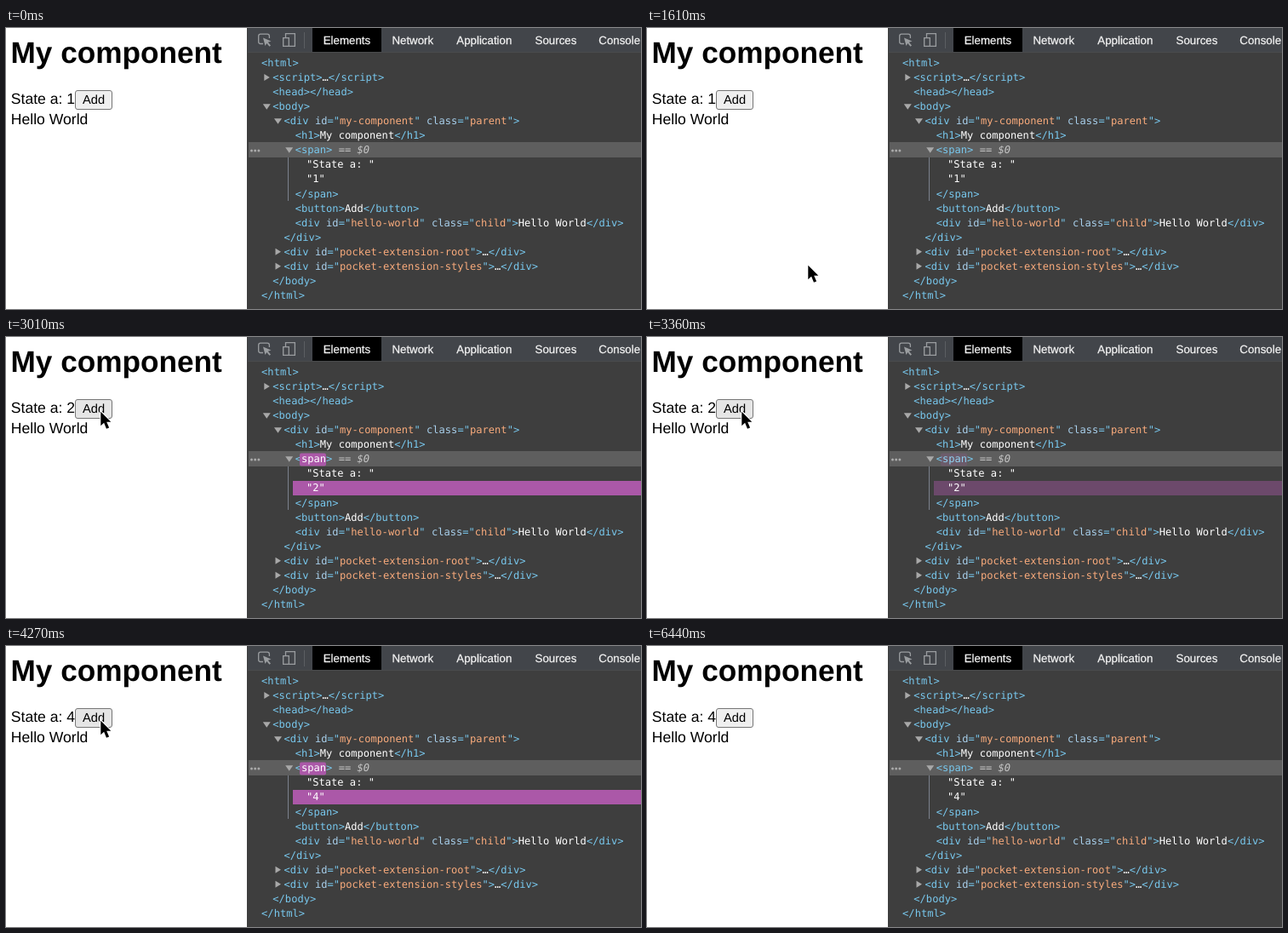
An HTML page that plays this animation: 746 px wide and 330 px high, repeating every 6.51 s.

```html
<!DOCTYPE html>
<html lang="en">
<head>
<meta charset="utf-8">
<title>DOM update demo</title>
<style>
  html, body { margin: 0; width: 100%; height: 100%; overflow: hidden; background: #fff; }
  svg { display: block; font: 17.6px "Liberation Sans", sans-serif; }
  text { white-space: pre; text-rendering: geometricPrecision; }
  #tabs { font-size: 13.3px; fill: #f4f4f4; stroke: #f4f4f4; stroke-width: .25; }
  #tree { font: 12.1px "DejaVu Sans Mono", monospace; fill: #fff; }
  .tag { fill: #78c8ee; }
  .attr { fill: #a9d0ec; }
  .value { fill: #f9ab7c; }
  .note { fill: #c8c8c8; }
  .arrow { fill: #a8a8a8; }
</style>
</head>
<body>
<svg width="746" height="330" viewBox="0 0 746 330">
  <text x="5.5" y="41" font-size="35.2" font-weight="bold">My component</text>
  <text x="5.8" y="89.3">State a: <tspan class="count"></tspan></text>
  <text x="5.8" y="113">Hello World</text>
  <rect id="button" x="81.5" y="73.5" width="43" height="22" rx="2.5" stroke="#767676"/>
  <text x="90" y="89.3" font-size="14.67">Add</text>

  <path d="M283 0H746V330H283z" fill="#3e3e3e"/>
  <path d="M284 0H746V28H284z" fill="#42454a"/>
  <path d="M284 28.5H746" stroke="#4a4b4d"/>
  <path d="M360 0H441V28H360z"/>
  <g fill="none" stroke="#9a9da0" stroke-width="1.3">
    <path d="M302 18.5H299Q296.7 18.5 296.7 16V9.5Q296.7 7.2 299 7.2H307Q309.4 7.2 309.4 9.5V12"/>
    <path d="M302 11.5L311.5 15.5 307.8 16.8 311 20.5 309.5 21.8 306.3 18 304.5 21z" fill="#9a9da0" stroke="none"/>
    <path d="M328.5 11V6.7H339.4V21.4H333M325.7 11.7H332.3V21.4H325.7z"/>
    <path d="M350.5 5V24" stroke="#5c5f62" stroke-width="1"/>
  </g>
  <g id="tabs"></g>

  <path d="M285 134H746V152H285z" fill="#5e5e5e"/>
  <path d="M331.5 152V203" stroke="#7b818c"/>
  <g fill="#aaa"><circle cx="288.5" cy="144" r="1.5"/><circle cx="292.7" cy="144" r="1.5"/><circle cx="296.9" cy="144" r="1.5"/></g>
  <rect id="rowFlash" x="337" y="169" width="409" height="17" fill="#ab58a8"/>
  <g id="tree"></g>
  <g id="tagFlash">
    <rect x="345" y="136.5" width="31" height="15" rx="2" fill="#ab58a8"/>
    <text x="347" y="147.4" font-size="12.1" fill="#fff" font-family="DejaVu Sans Mono, monospace">span</text>
  </g>
  <path id="cursor" d="M0 0V16.6L3.8 13.1 6.7 20 9.8 18.7 6.9 12H12z" stroke="#fff" stroke-width="2" paint-order="stroke"/>
</svg>
<script>
const LOOP = 6510, STEP = 70, FADE = 1400;
const CLICKS = [3010, 3640, 4270];
// Cursor stops: time, x, y
const PATH = [[1050, 738, 205], [1540, 189.3, 278.7], [1680, 189.3, 278.7], [2310, 111.3, 87.7],
              [5110, 111.3, 87.7], [5400, 750, 150]];
// Tree rows: indent, arrow (">" closed, "v" open), markup
const ROWS = [
  [0, "", "<html>"],
  [1, ">", "<script>…<\/script>"],
  [1, "", "<head></head>"],
  [1, "v", "<body>"],
  [2, "v", '<div id="my-component" class="parent">'],
  [3, "", "<h1>My component</h1>"],
  [3, "v", "<span>"],
  [4, "", '"State a: "'],
  [4, "", '"#"'],
  [3, "", "</span>"],
  [3, "", "<button>Add</button>"],
  [3, "", '<div id="hello-world" class="child">Hello World</div>'],
  [2, "", "</div>"],
  [2, ">", '<div id="pocket-extension-root">…</div>'],
  [2, ">", '<div id="pocket-extension-styles">…</div>'],
  [1, "", "</body>"],
  [0, "", "</html>"],
];
const $ = id => document.getElementById(id);
const span = (cls, text) => `<tspan class="${cls}">${text}</tspan>`;

function colourTag(tag) {
  const inner = tag.slice(1, -1).replace(/([\w-]+)="([^"]*)"/g,
    (_, name, value) => `${span("attr", name)}="${span("value", value)}"`);
  return span("tag", `&lt;${inner}&gt;`);
}

$("tree").innerHTML = ROWS.map(([indent, arrow, markup], i) => {
  const x = 300.1 + 13.2 * indent, y = 41 + 17.06 * i;
  let line = markup.replace(/<[^>]+>/g, colourTag).replace("#", span("count", ""));
  if (markup === "<span>") line += span("note", ' == <tspan font-style="italic">$0</tspan>');
  const shape = { ">": `M${x - 10} ${y - 4}v8l6.5 -4z`, v: `M${x - 11.5} ${y - 3}h9l-4.5 6.5z` }[arrow];
  return (shape ? `<path class="arrow" d="${shape}"/>` : "") + `<text x="${x}" y="${y + 4}">${line}</text>`;
}).join("");

$("tabs").innerHTML = [["Elements", 372.7], ["Network", 453.4], ["Application", 529.3], ["Sources", 621.6], ["Console", 696.3]]
  .map(([name, x]) => `<text x="${x}" y="19">${name}</text>`).join("");

// Ease-out of cubic-bezier(0, 0, .2, 1)
function easeOut(x) {
  let lo = 0, hi = 1;
  for (let i = 0; i < 20; i++) {
    const s = (lo + hi) / 2;
    if (0.6 * s * s + 0.4 * s ** 3 < x) lo = s; else hi = s;
  }
  return smooth(lo);
}
const smooth = s => s * s * (3 - 2 * s);

function cursorAt(t) {
  const i = PATH.findIndex(stop => stop[0] > t);
  if (i < 1) return null;
  const [t0, x0, y0] = PATH[i - 1], [t1, x1, y1] = PATH[i];
  const k = smooth((t - t0) / (t1 - t0));
  return [x0 + (x1 - x0) * k, y0 + (y1 - y0) * k];
}

function draw(t) {
  const done = CLICKS.filter(c => c <= t);
  document.querySelectorAll(".count").forEach(el => el.textContent = 1 + done.length);

  const age = done.length ? (t - done.at(-1)) / FADE : 1;
  const glow = age < 1 ? 1 - easeOut(age) : 0;
  $("rowFlash").setAttribute("opacity", glow);
  $("tagFlash").setAttribute("opacity", glow * glow);

  const pos = cursorAt(t);
  $("cursor").setAttribute("visibility", pos ? "visible" : "hidden");
  if (pos) $("cursor").setAttribute("transform", `translate(${pos})`);
  const hover = pos && pos[0] > 81 && pos[0] < 125 && pos[1] > 73 && pos[1] < 96;
  $("button").setAttribute("fill", hover ? "#e5e5e5" : "#efefef");
}

const start = performance.now();
function frame() {
  const t = (performance.now() - start) % LOOP;
  draw(Math.floor(t / STEP) * STEP);
  requestAnimationFrame(frame);
}
frame();
</script>
</body>
</html>
```
